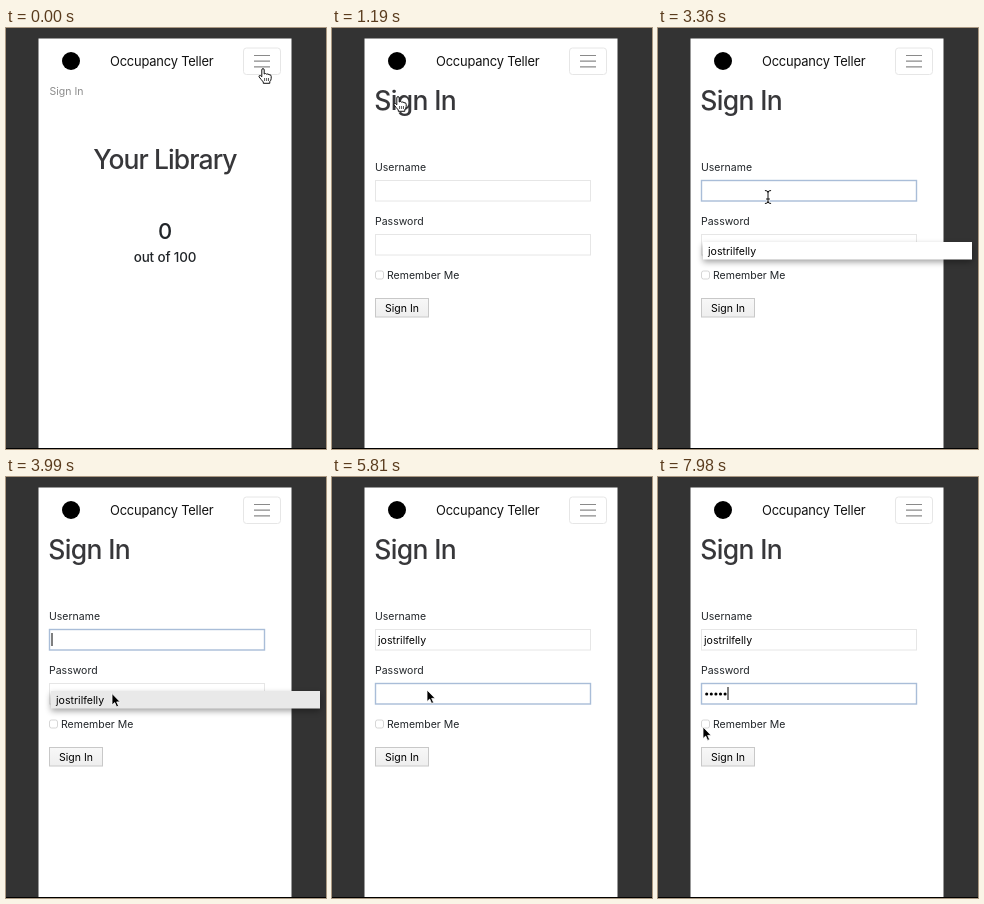
These frames come from a looping animation (320x421 px, 8 s). An HTML page:

```html
<!DOCTYPE html>
<html lang="en">
<head>
<meta charset="utf-8">
<title>Sign in</title>
<style>
  html, body { margin: 0; width: 100%; height: 100%; overflow: hidden; background: #333; }
  svg { display: block; width: 100%; height: 100%; }
  text { font-family: Inter, Roboto, sans-serif; font-size: 10.5px; fill: #212529; white-space: pre; }
  .title { font-size: 26.5px; font-weight: 500; letter-spacing: -.035em; fill: #37373a; }
  .brand { font-size: 12.9px; letter-spacing: -.015em; fill: #111; }
  .mid { text-anchor: middle; }
  .typed { font-size: 10.6px; fill: #000; }
  .box { fill: #fff; stroke: #e6e6e6; }
  .box.focus { stroke: #a9bdd8; stroke-width: 1.4; }
  .cursor { fill: #000; stroke: #fff; stroke-width: .8; stroke-linejoin: round; }
</style>
</head>
<body>
<svg viewBox="0 0 320 421" preserveAspectRatio="none">
  <defs>
    <filter id="soft" x="-20%" y="-80%" width="140%" height="300%"><feGaussianBlur stdDeviation="3"/></filter>
    <linearGradient id="face" x2="0" y2="1">
      <stop stop-color="#f8f8f8"/><stop offset="1" stop-color="#eee"/>
    </linearGradient>
  </defs>

  <rect width="320" height="421" fill="#333"/>
  <rect x="32.5" y="10.5" width="253" height="410" fill="#fff"/>
  <rect y="420" width="320" height="1" fill="#000"/>

  <circle cx="65" cy="33" r="9" fill="#000"/>
  <text class="brand" x="104" y="38">Occupancy Teller</text>
  <rect x="237.5" y="20" width="37" height="26.5" rx="3" fill="#fff" stroke="#e6e6e6"/>
  <path d="M248 27.5h16M248 33.2h16M248 38.8h16" stroke="#8a8a8a" stroke-width="1.2"/>

  <g id="home">
    <text x="43.5" y="67" style="fill:#8c8c8c">Sign In</text>
    <text class="title mid" x="159" y="141">Your Library</text>
    <text class="mid" x="159" y="211" style="font-size:22px;font-weight:500">0</text>
    <text class="mid" x="159" y="234" style="font-size:13.4px;font-weight:500;letter-spacing:-.01em">out of 100</text>
  </g>

  <g id="form">
    <text class="title" x="42.3" y="82" style="letter-spacing:-.025em">Sign In</text>
    <text x="43" y="143">Username</text>
    <rect id="user" class="box" x="43.5" y="152.5" width="215" height="20.5"/>
    <text id="name" class="typed" x="46" y="167">jostrilfelly</text>
    <text x="43" y="196.5">Password</text>
    <rect id="pass" class="box" x="43.5" y="206.5" width="215" height="20.5"/>
    <g id="dots"></g>
    <rect id="caret" width="1" height="13" fill="#000"/>
    <rect x="43.5" y="243" width="8" height="8" rx="2" fill="#fff" stroke="#d2d2d2" stroke-width=".9"/>
    <text x="55" y="250.5">Remember Me</text>
    <rect x="43.5" y="270.5" width="53" height="18.5" fill="url(#face)" stroke="#c8c8c8"/>
    <text class="mid" x="70" y="283.5" style="fill:#000">Sign In</text>
  </g>

  <g id="menu">
    <rect x="45" y="217" width="269" height="17" fill="#000" opacity=".38" filter="url(#soft)"/>
    <rect id="item" x="45" y="214" width="269" height="17.5"/>
    <text class="typed" x="50" y="226.7">jostrilfelly</text>
  </g>

  <circle id="ring" fill="#777" fill-opacity=".12" stroke="#777" stroke-opacity=".35"/>

  <path id="arrow" class="cursor" d="M0 0V11.6L2.7 9.1 4.6 13.4 6.6 12.5 4.7 8.4H8.2Z"/>
  <g id="beam" fill="none" stroke-linecap="round">
    <path d="M-2.7-6.5Q0-6.5 0-4.5Q0-6.5 2.7-6.5M0-4.5V4.5M-2.7 6.5Q0 6.5 0 4.5Q0 6.5 2.7 6.5M-1.5 2H1.5" stroke="#fff" stroke-width="2.4"/>
    <path d="M-2.7-6.5Q0-6.5 0-4.5Q0-6.5 2.7-6.5M0-4.5V4.5M-2.7 6.5Q0 6.5 0 4.5Q0 6.5 2.7 6.5M-1.5 2H1.5" stroke="#111" stroke-width="1"/>
  </g>
  <g id="hand">
    <path d="M-1.2 1Q-1.2-.4 0-.4T1.2 1V5Q2.6 3.9 3.7 5.2Q5 4.4 6 5.7Q8 5.2 8.2 7.3V9.5Q8 11.5 6.8 12.6V14.3H.3V13Q-1.7 10.7-4 7.8Q-4.2 6.2-2.6 6.5L-1.2 7.8Z" fill="#fff" stroke="#111" stroke-linejoin="round"/>
    <path d="M1.6 9v3M3.6 9v3M5.5 9v3" stroke="#111" stroke-width=".7"/>
  </g>
</svg>

<script>
const LOOP = 8000, TICK = 70;
const el = id => document.getElementById(id);
const show = (id, on) => { el(id).style.display = on ? '' : 'none'; };
const within = (t, from, to) => t >= from && t < to;

// time, x, y, pointer shape
const PATH = [
  [0, 257, 41, 'hand'], [70, 254, 48, 'arrow'], [210, 226, 118, 'arrow'], [350, 165, 180, 'arrow'],
  [490, 104, 150, 'arrow'], [630, 66, 72, 'hand'], [700, 66, 69, 'hand'],
  [1260, 66, 69, 'beam'], [1680, 66, 69, 'beam'], [2030, 110, 166, 'beam'],
  [3290, 110, 166, 'beam'], [3360, 110, 169, 'beam'], [3570, 110, 178, 'arrow'],
  [3850, 108, 212, 'arrow'], [4130, 104, 221, 'arrow'],
  [4690, 104, 221, 'arrow'], [4830, 78, 217, 'arrow'], [5040, 95, 213, 'arrow'],
  [6160, 95, 213, 'none'], [7420, 94, 214, 'arrow'], [7980, 45, 250, 'arrow'], [LOOP, 45, 250, 'arrow']
];

// start, end, x, y, radius
const CLICKS = [
  [700, 840, 66, 69, 26.5], [840, 910, 66, 69, 20],
  [2240, 2380, 110, 166, 14.5], [5180, 5250, 97, 218, 14.5]
];

const KEYS = [6160, 6440, 6510, 6790, 7000];
const DOT_STEP = 4.6;

// start, end, field row, x
const CARETS = [
  [2450, 3010, 156, 45.5], [3570, 4130, 156, 45.5], [4760, 5180, 156, 97.5], [5180, 5810, 210, 45.5]
];

el('dots').innerHTML = KEYS.map((_, i) =>
  `<circle cx="${48.7 + i * DOT_STEP}" cy="217" r="1.55"/>`).join('');

function place(id, x, y) {
  el(id).setAttribute('transform', `translate(${x} ${y})`);
}

function drawPointer(t) {
  const i = PATH.findLastIndex(key => key[0] <= t);
  const a = PATH[i], b = PATH[i + 1];
  const k = (t - a[0]) / (b[0] - a[0]);
  for (const shape of ['arrow', 'beam', 'hand']) {
    show(shape, shape === a[3]);
    place(shape, a[1] + (b[1] - a[1]) * k, a[2] + (b[2] - a[2]) * k);
  }
}

function drawCaret(t, typed) {
  const mark = typed
    ? [0, 0, 210, 46.5 + typed * DOT_STEP]
    : CARETS.find(c => within(t, c[0], c[1]));
  show('caret', mark);
  if (mark) {
    el('caret').setAttribute('x', mark[3]);
    el('caret').setAttribute('y', mark[2]);
  }
}

function drawRing(t) {
  const click = CLICKS.find(c => within(t, c[0], c[1]));
  show('ring', click);
  if (click) {
    place('ring', click[2], click[3]);
    el('ring').setAttribute('r', click[4]);
  }
}

function render(time) {
  const t = Math.floor(time / TICK) * TICK;
  const typed = KEYS.filter(key => key <= t).length;
  show('home', t < 1120);
  show('form', t >= 1120);
  show('name', t >= 4200);
  el('user').classList.toggle('focus', within(t, 2380, 5180));
  el('pass').classList.toggle('focus', t >= 5180);
  show('menu', within(t, 2380, 4200));
  el('menu').style.opacity = t < 2450 ? .6 : 1;
  el('item').setAttribute('fill', within(t, 3920, 4200) ? '#e9e9e9' : '#fff');
  [...el('dots').children].forEach((dot, i) => { dot.style.display = i < typed ? '' : 'none'; });
  drawCaret(t, typed);
  drawRing(t);
  drawPointer(t);
}

const start = performance.now();
function loop() {
  render((performance.now() - start) % LOOP);
  requestAnimationFrame(loop);
}
loop();
</script>
</body>
</html>
```
